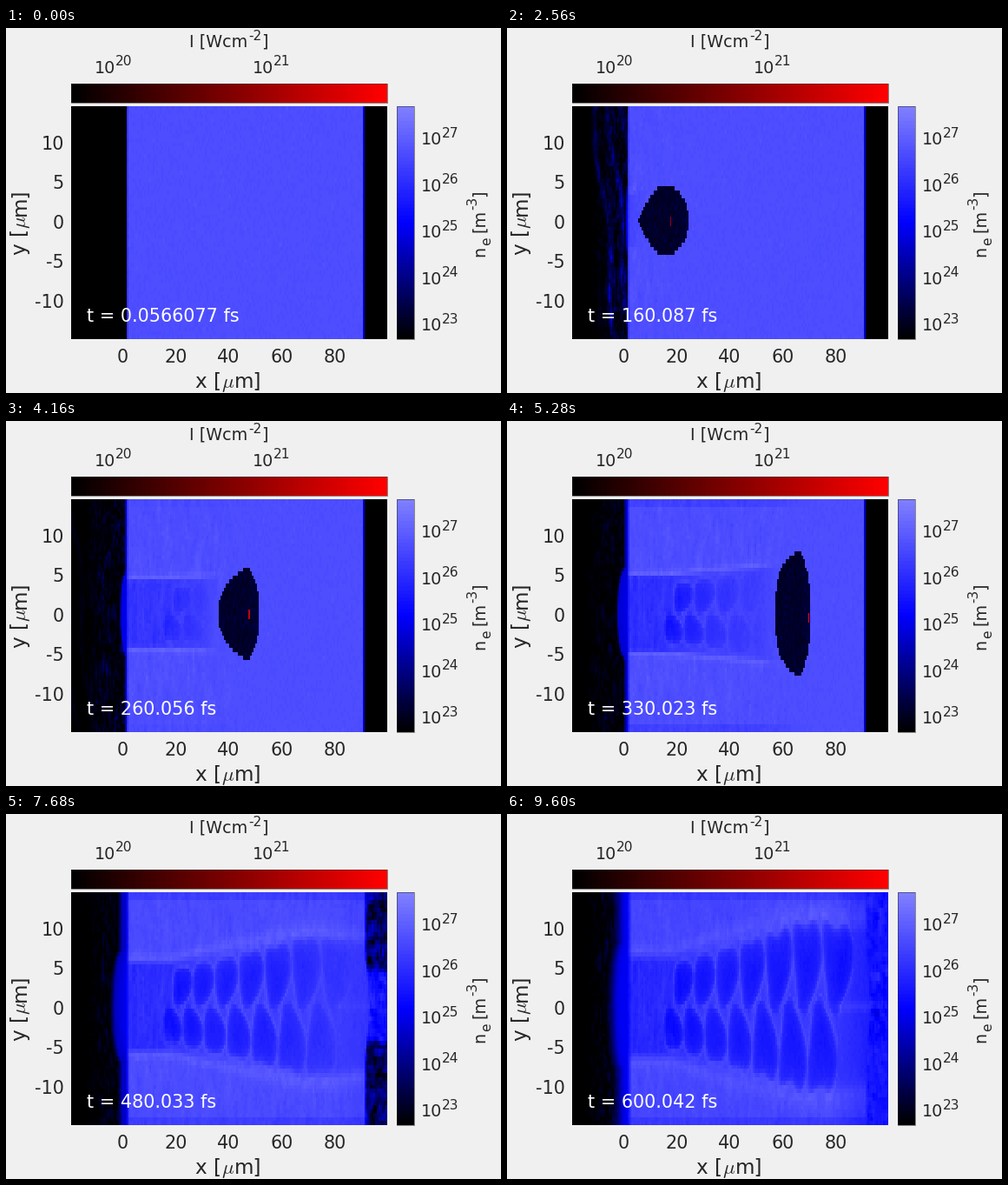
Animation of 570x420 px, one loop 9.76 s. Source, as a matplotlib script:

```python
import numpy as np
import matplotlib.pyplot as plt
from matplotlib.animation import FuncAnimation
from matplotlib.colors import LinearSegmentedColormap
from matplotlib.patches import Rectangle

FRAMES, INTERVAL = 61, 160
STEP = 0.1132154                       # simulation time step, fs
LEFT, RIGHT, TOP, BOTTOM = 75, 439, 90, 358
NX, NY = 182, 58
SLAB_L, SLAB_R = 139, 413
CY = 221.5                             # laser axis
INK = "#262626"
TICK, LABEL, BAR, SMALL = 20.8, 23.1, 19.2, 15.4

plt.rcParams["font.family"] = "DejaVu Sans"
DENSITY = LinearSegmentedColormap.from_list(
    "density", [(0, 0, 0), (0, 0, 1), (0.5, 0.5, 1)], N=64)
INTENSITY = LinearSegmentedColormap.from_list(
    "intensity", [(0, 0, 0), (1, 0, 0)], N=64)

fig = plt.figure(figsize=(5.7, 4.2), dpi=100, facecolor="#f0f0f0")
ax = fig.add_axes([0, 0, 1, 1])


# ---------- axes, colour bars and labels ----------
def text(x, y, s, size, color=INK, **kw):
    return ax.text(x, y, s, fontsize=size * 0.72, color=color,
                   va="baseline", **kw)


def turned(x, y, s, size, **kw):
    text(x, y, s, size, rotation=90, rotation_mode="anchor", **kw)


def power(x, y, exponent):
    text(x, y, "10", BAR)
    text(x + 24, y - 8.5, str(exponent), SMALL)


def image(x0, x1, y0, y1, data, cmap):
    return ax.imshow(data, cmap=cmap, vmin=0, vmax=1, aspect="auto",
                     extent=(x0, x1, y1, y0), interpolation="nearest", zorder=1)


def bar(x0, x1, y0, y1, data, cmap):
    image(x0, x1, y0, y1, data, cmap)
    ax.add_patch(Rectangle((x0, y0), x1 - x0, y1 - y0, fill=False, ec=INK,
                           lw=0.36, zorder=2))


ramp = np.linspace(0, 1, 64)
bar(75, 439, 64, 86, ramp[None, :], INTENSITY)
bar(450, 470, 90, 358, ramp[::-1, None], DENSITY)

for i in range(5):
    text(134.5 + 61 * i, 385, str(20 * i), TICK, ha="center")
    text(67, 139.7 + 45.5 * i, str(10 - 5 * i), TICK, ha="right")
    power(478, 134.5 + 53.4 * i, 27 - i)
for i in range(2):
    power(102 + 182 * i, 51.5, 20 + i)

MU = dict(s=r"$\mu$", size=LABEL, math_fontfamily="cm")
text(218, 414, "x [", LABEL)
text(247.5, 414, **MU)
text(263, 414, "m]", LABEL)
turned(22.5, 261, "y [", LABEL)
turned(22.5, 231, **MU)
turned(22.5, 215.5, "m]", LABEL)

text(211, 22, "I [Wcm", BAR)
text(279, 13.5, "-2", SMALL)
text(294.5, 22, "]", BAR)
turned(551, 263, "n", BAR)
turned(558.5, 250.5, "e", SMALL)
turned(551, 235, "[m", BAR)
turned(542, 209, "-3", SMALL)
turned(551, 193.5, "]", BAR)

# ---------- density field ----------
dx, dy = (RIGHT - LEFT) / NX, (BOTTOM - TOP) / NY
X, Y = np.meshgrid(LEFT + dx * (np.arange(NX) + 0.5),
                   TOP + dy * (np.arange(NY) + 0.5))
D = np.abs(Y - CY)


def ease(z, a, b):
    """Linear ramp from 0 at a to 1 at b."""
    return np.clip((z - a) / (b - a), 0, 1)


def bump(z):
    return np.exp(-z * z)


def streaks(seed, rows, cols):
    """Random texture with unit spread, smeared over rows and columns."""
    a = np.random.default_rng(seed).normal(size=(NY, NX))
    a = sum(np.roll(a, k, 0) for k in range(rows))
    a = sum(np.roll(a, k, 1) for k in range(cols))
    return a / a.std()


GRAIN = streaks(1, 1, 1)
TALL = streaks(2, 5, 2)
WISP = streaks(3, 4, 2)
SPECK = streaks(4, 2, 3)


def front(n):
    return 242 + 8.3 * (n - 20)


def channel_width(n):
    return 37 + .675 * (n - 20)


def left_vacuum(n):
    wisp = np.abs(np.roll(WISP, -n, 1))
    haze = .09 * bump((n - 19) / 7) + .045 * ease(n, 15, 30)
    start = 118 - 30 * ease(n, 11, 18)
    v = haze * ease(X, start, start + 25) * wisp

    # twin plumes blown off the surface
    grow, fade = ease(n, 7, 11), 1 - ease(n, 12, 16)
    spine = SLAB_L - 9 * ease(D, 40, 70) * grow
    r = np.hypot((X - spine) / (1 + 7 * grow), (D - 62) / (1 + 22 * grow))
    v += .42 * grow * fade * bump((r - .9) / .3) * (.7 + .25 * wisp)

    # arcs drifting away to the left
    level = .15 * ease(n, 11, 13) * (1 - ease(n, 21, 28))
    for k in range(3):
        arc = 137 - 6 * (n - 12) + 17 * k + Y / 11 - 20 + 4 * np.sin(Y / 30 + k)
        v += level * bump((X - arc) / 3) * (.5 + .5 * np.abs(TALL))
    return np.clip(v, 0, .5)


def right_vacuum(n):
    speck = np.roll(SPECK, n, 1)
    haze = (.05 * ease(n, 39, 41) + .15 * ease(n, 41, 48)
            + .37 * ease(n, 48, 60))
    v = haze * (1 + (.7 - .65 * ease(n, 41, 60)) * speck)
    v += .25 * ease(n, 39, 42) * (1 - ease(n, 42, 50)) * bump((X - SLAB_R) / 7)
    plume = ease(n, 42, 47) * (1 - ease(D, 36, 44))
    v = v * (1 - plume) + plume * (.55 + .04 * speck)
    return np.clip(v, 0, .66)


def channel(n, v, tail):
    """Channel behind the pulse, filled by two rows of interleaved cavities."""
    late = ease(n, 33, 60)
    spread = ease(X, 190, 340)
    H = channel_width(n) + 1.1 * (n - 20) * spread * (1 - .2 * ease(X, 365, 405))
    behind = ease(tail + 6 - X, 0, 25)
    inside = behind * ease(H - D, 0, 4 + 10 * late)
    near = 1 - ease(X, 170, 240)

    v = v - inside * (.05 + .07 * near * ease(n, 11, 33) + .02 * TALL * (.3 + near))
    halo = (D - H) / (4 + 10 * late * (.3 + spread))
    v += behind * (.06 - .02 * late) * bump(halo)

    # cavity number along x: widths grow steadily, lower row half a step behind
    bow = 5 * (2 * D / H - 1) ** 2
    k = (np.sqrt(22 ** 2 + 4.4 * np.clip(X + bow - 192, -60, None)) - 22) / 2.2
    axis = CY - (2 + 12 * late * ease(X, 230, 320)) * np.cos(2 * np.pi * k)
    k = np.where(Y < axis, k, k + .5)
    u = 2 * (k % 1) - 1
    tall = H * (.8 + .2 * spread)
    r = np.hypot(u, (np.abs(Y - axis) - .5 * tall) / (.5 * tall))

    age = n - 20 - (X - 242) / 8.3
    row = behind * ease(age, 6, 20) * ((k > 0) & (k < 7))
    depth = .14 * (1 - .5 * ease(X, 250, 400) * (1 - late))
    v -= row * depth * np.sqrt(np.clip(1 - r * r, 0, 1))
    v += row * .05 * bump((r - 1.03) / .13)
    return v


def bubble(n):
    """Mask of the evacuated cavity and its rear position on axis."""
    formed, closed = ease(n, 11, 20), ease(n, 20, 33)
    h = 39 * ease(n, 6, 11) + 33 * closed
    length = 60 - 28 * ease(n, 14, 41)
    recess = 24 - 12 * formed
    pinch = 42 * formed - 29 * ease(n, 20, 41)
    q = D / h
    tail = front(n) - length
    rear = tail + pinch * q ** (1.3 + 2.7 * closed)
    rear = rear + 9 * ease(n, 33, 41) * bump(D / 16)
    return (q < 1) & (X < front(n) - recess * q ** 2.6) & (X > rear), tail


def density(n):
    late = ease(n, 41, 60)
    bulge = 10 * ease(n, 12, 36) - 3 * late
    reach = channel_width(n) + 6
    xl = 138 - 17 * ease(n, 12, 60) ** 2
    xl = xl - bulge * np.sqrt(np.clip(1 - (D / reach) ** 2, 0, 1))
    xr = SLAB_R + ease(n, 40, 46) * (2 + 5 * (1 - ease(D, 0, 60)))

    passed = ease(front(n) - X, 0, 60)
    body = .8 - .03 * late + .005 * GRAIN + .01 * TALL * passed
    body -= .05 * ease(n, 24, 32) * passed * (np.abs(Y - 224) > 126)
    body -= .13 * late * ease(X, 375, 425)
    cavity, tail = bubble(max(n, 7))
    if n > 11:
        body = channel(n, body, tail)

    # the surface layer thins out towards the vacuum
    skin = .48 - .16 * ease(n, 20, 45) * (1 - ease(X - xl, 0, 18))
    slab = skin + (body - skin) * ease(X, 138.5, 140.5 + 3 * ease(n, 30, 60))

    wl = ease(X - xl, 0, 2 + 10 * late)
    wr = ease(xr - X, 0, 2)
    v = left_vacuum(n) * (1 - wl) + slab * wl
    v = right_vacuum(n) * (1 - wr) + v * wr
    v += .06 * late * bump((Y - CY) / 6) * ease(X, 360, 400)

    if 8 <= n <= 44:
        rim = ease(X, front(n) - 12, front(n))
        dark = .07 + .025 * np.abs(GRAIN) + .03 * rim
        v = np.where(cavity & (X > xl) & (X < xr), dark, v)
    return np.clip(v, 0, 1)


field = image(LEFT, RIGHT, TOP, BOTTOM, density(0), DENSITY)
pulses = [ax.add_patch(Rectangle((0, 0), 1.4, 11, lw=0, zorder=3))
          for _ in range(2)]
clock = text(93, 338, "", TICK, color="white", zorder=4)
ax.set_xlim(0, 570)
ax.set_ylim(420, 0)
ax.axis("off")


def draw(n):
    field.set_data(density(n))
    t = np.ceil(10 * n / STEP) * STEP if n else STEP / 2
    clock.set_text(f"t = {t:.6g} fs")

    catch_up = ease(n, 20, 33)
    x = front(n) - 21 + 18 * catch_up
    y = 216.5 + 4 * ease(n, 28, 33) + 32 * ease(n, 33, 41)
    for k, (pulse, last) in enumerate(zip(pulses, (41, 13))):
        pulse.set_visible(10 <= n <= last)
        pulse.set_xy((x - 9 * k, y))
        pulse.set_facecolor((.58 + .4 * catch_up, 0, .06))
    return [field, clock, *pulses]


anim = FuncAnimation(fig, draw, frames=FRAMES, interval=INTERVAL,
                     init_func=lambda: draw(0), repeat=True, repeat_delay=0)
plt.show()
```
